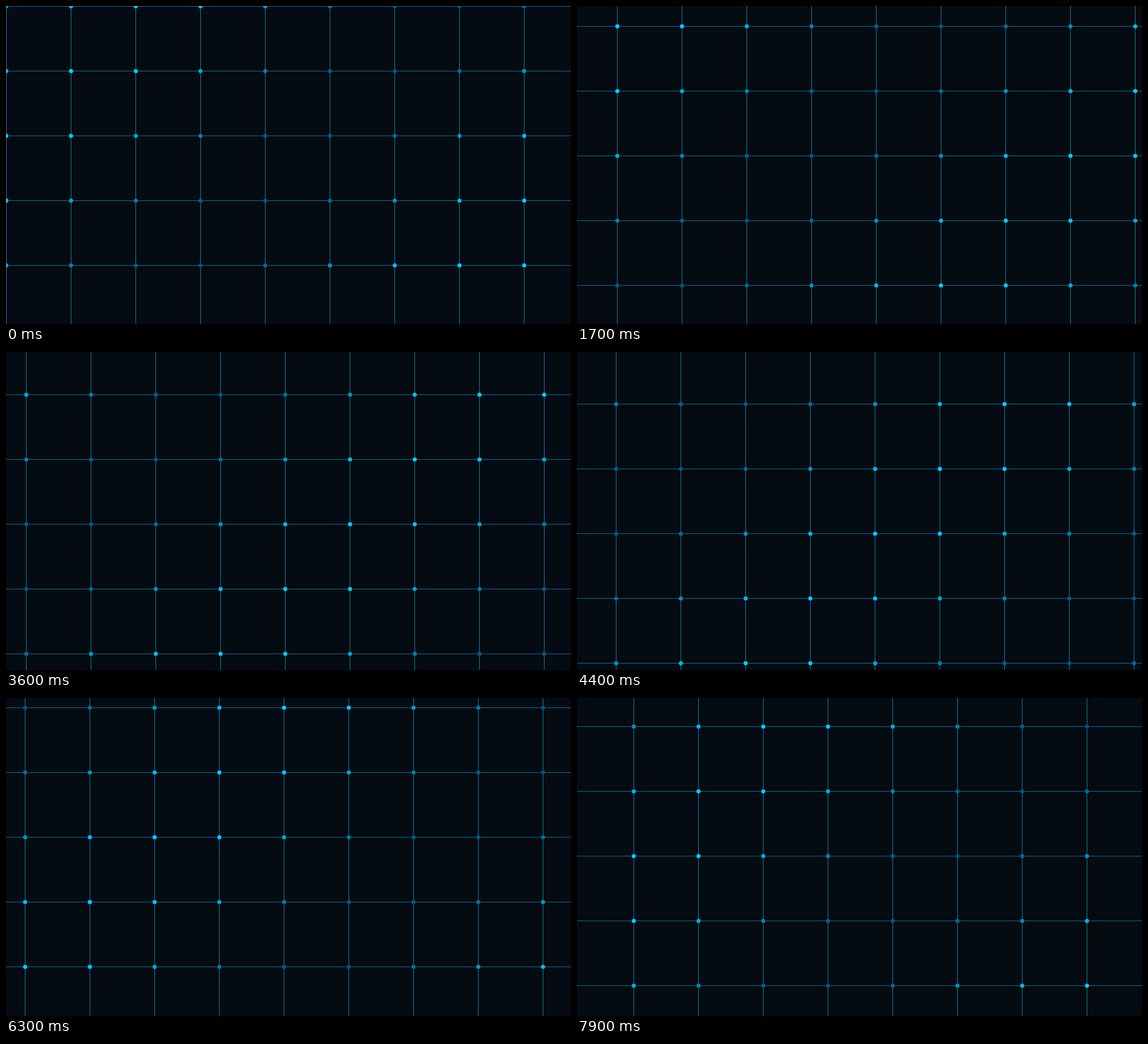
Recreate the animation shown at these times as an HTML page with a canvas. Size 960 by 540 pixels, loop 8 s.

```html
<!DOCTYPE html>
<html lang="en">
<head>
<meta charset="utf-8">
<title>Drifting grid</title>
<style>
  html, body { margin: 0; width: 100%; height: 100%; overflow: hidden; background: #040b12; }
  canvas { display: block; }
</style>
</head>
<body>
<canvas id="stage" width="960" height="540"></canvas>
<script>
const ctx = document.getElementById('stage').getContext('2d');
const W = 960, H = 540, CELL = 110;
const STEP = 100, STEPS = 80;

function dot(x, y, glow) {
  const g = Math.round(85 + 127 * glow), b = Math.round(125 + 130 * glow);
  ctx.fillStyle = `rgb(0, ${g}, ${b})`;
  ctx.beginPath();
  ctx.arc(x + 0.5, y + 0.5, 3.5, 0, Math.PI * 2);
  ctx.fill();
}

function draw(step) {
  const dx = step * 4 % CELL, dy = step * 2 % CELL;
  const phase = step / STEPS * Math.PI * 2;

  ctx.fillStyle = '#040b12';
  ctx.fillRect(0, 0, W, H);

  ctx.fillStyle = '#0a7fa3';
  for (let x = dx; x < W; x += CELL) ctx.fillRect(x, 0, 1, H);
  ctx.fillStyle = '#0a6c95';
  for (let y = dy; y < H; y += CELL) ctx.fillRect(0, y, W, 1);

  for (let row = -1; row < 6; row++) {
    for (let col = -1; col < 10; col++) {
      const glow = 0.5 + 0.5 * Math.sin((col + row) * 0.7 + phase);
      dot(col * CELL + dx, row * CELL + dy, glow);
    }
  }
}

const start = performance.now();
function frame(now) {
  draw(Math.floor(Math.max(0, now - start) / STEP) % STEPS);
  requestAnimationFrame(frame);
}
draw(0);
requestAnimationFrame(frame);
</script>
</body>
</html>
```
